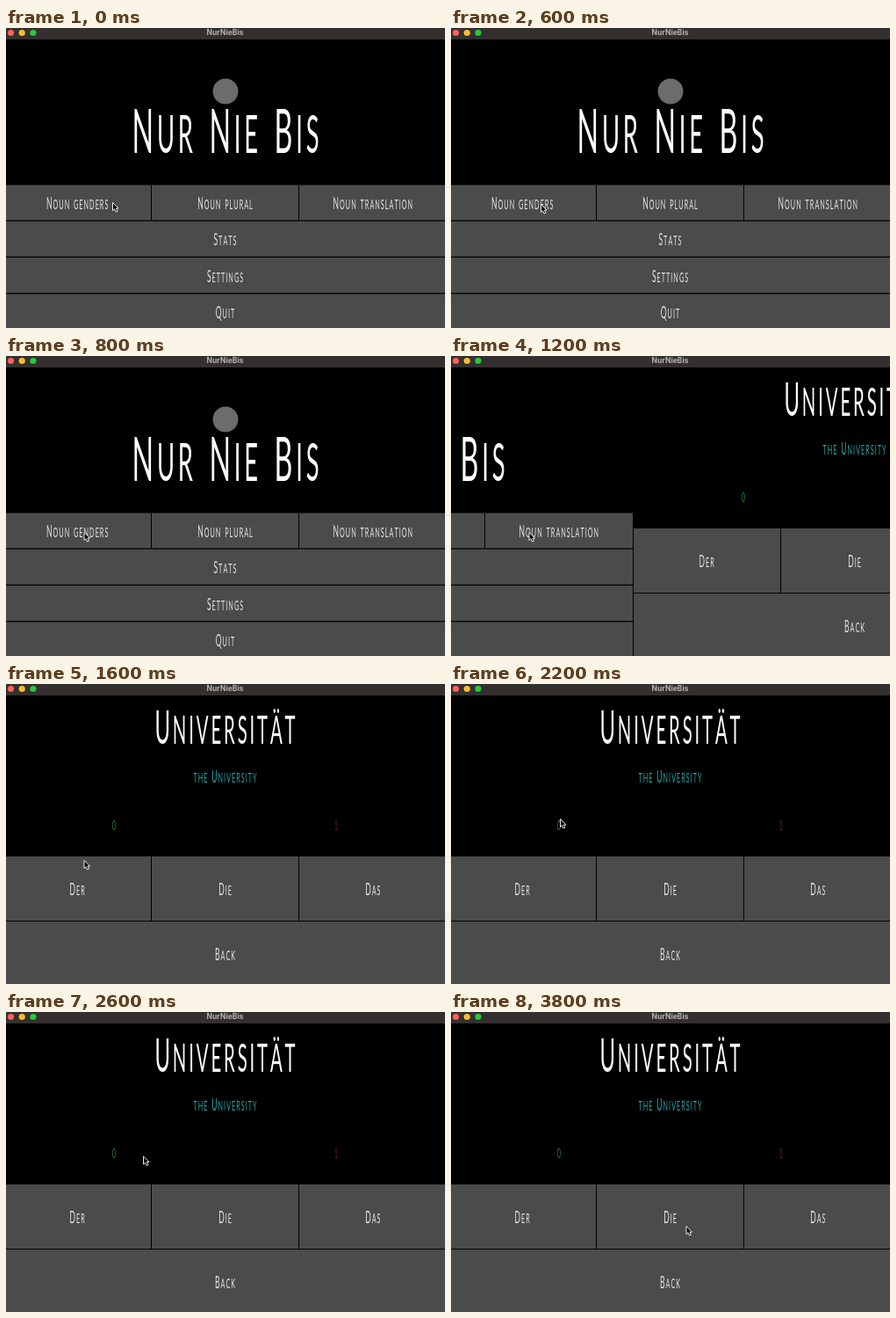
An HTML page with a canvas for the animation above (5 s loop, 500 px wide and 341 px high).

```html
<!DOCTYPE html>
<html lang="de">
<head>
<meta charset="utf-8">
<style>
  html, body { margin: 0; height: 100%; overflow: hidden; background: #000; }
  canvas { display: block; }
</style>
</head>
<body>
<canvas id="stage" width="500" height="341"></canvas>
<script>
const ctx = document.getElementById('stage').getContext('2d');
const LOOP = 5000, PAGE = 505, LEFT = -3;
const CONDENSE = 0.46, SMALL = 0.85, GAP = 0.33, TRACK = 0.12;
const MID = LEFT + PAGE / 2;
const LABEL = 18.5;

// start time, pointer x, pointer y, offset of the quiz page
const steps = [
  [0, 121, 198, PAGE],
  [600, 102, 200, PAGE],
  [800, 88.5, 200, PAGE],
  [1200, 88.5, 200, 210],
  [1400, 88.5, 200, 10],
  [1600, 88.5, 200, 0],
  [2000, 124, 153, 0],
  [2400, 136, 143, 0],
  [2600, 156, 163.5, 0],
  [3800, 267.5, 243, 0]
];

function rect(x, y, w, h, color) {
  ctx.fillStyle = color;
  ctx.fillRect(x, y, w, h);
}

function dot(x, y, r, color) {
  ctx.fillStyle = color;
  ctx.beginPath();
  ctx.arc(x, y, r, 0, 7);
  ctx.fill();
}

// Condensed, loosely tracked small caps, centred on x
function caps(text, x, base, size, color) {
  ctx.save();
  ctx.translate(x, base);
  ctx.scale(CONDENSE, 1);
  ctx.fillStyle = color;
  ctx.textAlign = 'left';
  const track = size * TRACK;
  const glyphs = [...text].map(c => {
    const upper = c.toUpperCase();
    ctx.font = `${c === upper ? size : size * SMALL}px Lato, sans-serif`;
    const width = c === ' ' ? size * GAP : ctx.measureText(upper).width;
    return { upper, width: width + track, font: ctx.font };
  });
  let pen = (track - glyphs.reduce((sum, g) => sum + g.width, 0)) / 2;
  for (const g of glyphs) {
    ctx.font = g.font;
    ctx.fillText(g.upper, pen, 0);
    pen += g.width;
  }
  ctx.restore();
}

// A row of equal buttons, each with a thin black line on its left
function row(labels, y, h, base) {
  const w = PAGE / labels.length;
  rect(LEFT, y, PAGE, h, '#4b4b4b');
  labels.forEach((label, i) => {
    rect(Math.floor(LEFT + w * i), y, 1, h, '#000');
    caps(label, LEFT + w * (i + 0.5), base, LABEL, '#e6e6e6');
  });
}

function menu() {
  dot(250, 72, 14.5, '#6c6c6c');
  caps('Nur Nie Bis', 250, 142, 70, '#fff');
  const rows = [['Noun genders', 'Noun plural', 'Noun translation'], ['Stats'], ['Settings'], ['Quit']];
  rows.forEach((labels, i) => row(labels, 178.5 + 41.25 * i, 40, 206 + 41.25 * i));
}

function quiz() {
  caps('Universität', MID, 68, 52, '#fff');
  caps('the University', MID, 111.5, LABEL, '#27a5a8');
  caps('0', 123, 166, 16, '#1f8136');
  caps('1', 376, 166, 16, '#7d1832');
  row(['Der', 'Die', 'Das'], 196, 73, 240);
  row(['Back'], 270, 73, 313.5);
}

function page(draw, x) {
  ctx.save();
  ctx.translate(x, 0);
  draw();
  ctx.restore();
}

function titleBar() {
  rect(0, 0, 500, 13, '#33302f');
  ['#ff5f57', '#febc2e', '#28c840'].forEach((c, i) => dot(5.5 + 12.7 * i, 5.5, 3.6, c));
  ctx.font = 'bold 8.5px Inter, sans-serif';
  ctx.textAlign = 'center';
  ctx.fillStyle = '#b4b1b0';
  ctx.fillText('NurNieBis', 249.5, 8.3);
}

const arrow = new Path2D('M0 0V9L2 7.2L3.6 10.5L5.4 9.7L3.9 6.5H6.6Z');

function pointer(x, y) {
  ctx.save();
  ctx.translate(x + 0.5, y + 0.5);
  ctx.fillStyle = '#000';
  ctx.fill(arrow);
  ctx.strokeStyle = '#fff';
  ctx.lineWidth = 0.9;
  ctx.stroke(arrow);
  ctx.restore();
}

function frame() {
  const t = performance.now() % LOOP;
  const [, x, y, shift] = steps.filter(s => s[0] <= t).pop();
  rect(0, 0, 500, 341, '#000');
  if (shift > 0) page(menu, shift - PAGE);
  if (shift < PAGE) page(quiz, shift);
  titleBar();
  pointer(x, y);
  requestAnimationFrame(frame);
}
frame();
</script>
</body>
</html>
```
